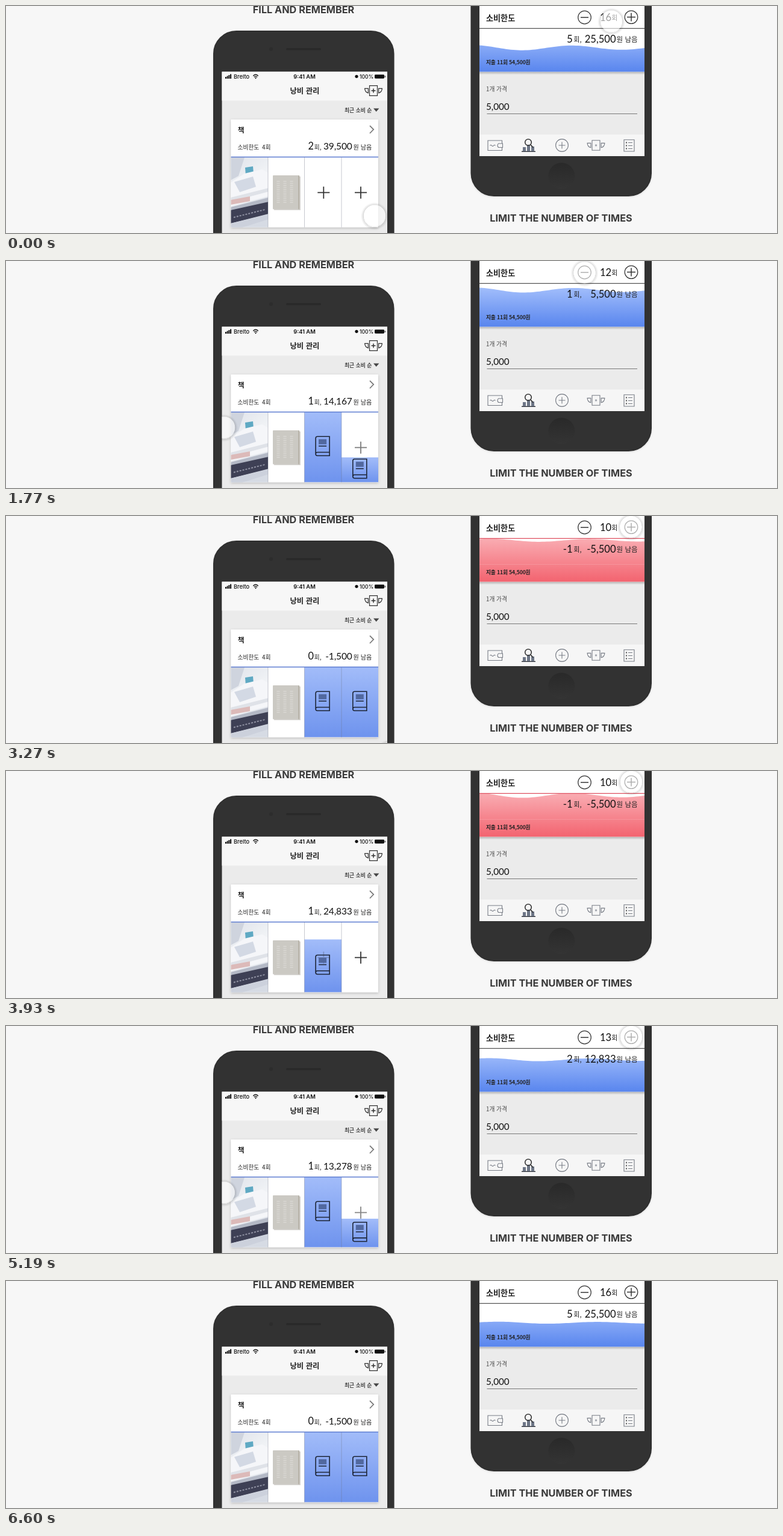
These frames come from a looping animation (1280x378 px, 6.63 s). An HTML page:

```html
<!DOCTYPE html>
<html lang="ko">
<head>
<meta charset="utf-8">
<title>Spending limits</title>
<style>
html, body { margin: 0; width: 100%; height: 100%; overflow: hidden; background: #f7f7f7; }
svg { display: block; width: 100%; height: 100%; }
text { font-family: "Noto Sans CJK KR", "Noto Sans CJK JP", "Noto Sans CJK", sans-serif; fill: #222; }
.head { font: 700 16.25px Inter, sans-serif; fill: #3a3a3a; text-anchor: middle; }
.bar { font: 500 9.3px Inter, sans-serif; fill: #111; }
.num { font-family: Lato, sans-serif; fill: #111; }
.end { text-anchor: end; }
.line { fill: none; stroke: #333; stroke-width: 1.2; }
.tab { fill: none; stroke: #777c85; stroke-width: 1.1; }
</style>
</head>
<body>
<svg viewBox="0 0 1280 378" preserveAspectRatio="xMidYMid meet">
<defs>
  <linearGradient id="cellBlue" x2="0" y2="1"><stop stop-color="#a2bcf9"/><stop offset="1" stop-color="#6e93ee"/></linearGradient>
  <linearGradient id="water" gradientUnits="userSpaceOnUse" x1="0" x2="0" y1="40" y2="110"><stop id="waterTop"/><stop id="waterEnd" offset="1"/></linearGradient>
  <linearGradient id="drop" x2="0" y2="1"><stop stop-opacity=".24"/><stop offset="1" stop-opacity="0"/></linearGradient>
  <linearGradient id="home" x2="0" y2="1"><stop stop-color="#292929"/><stop offset="1" stop-color="#343434"/></linearGradient>
  <linearGradient id="desk" x2=".4" y2="1"><stop stop-color="#dfe3ea"/><stop offset=".5" stop-color="#f1f3f6"/><stop offset="1" stop-color="#d6dbe4"/></linearGradient>
  <radialGradient id="halo"><stop offset=".79" stop-opacity="0"/><stop offset=".8" stop-opacity=".13"/><stop offset="1" stop-opacity="0"/></radialGradient>
  <filter id="soft" x="-10%" y="-10%" width="120%" height="125%"><feDropShadow dx="0" dy="1.5" stdDeviation="2" flood-opacity=".2"/></filter>
  <filter id="faint" x="-10%" y="-10%" width="120%" height="125%"><feDropShadow dx="0" dy="1" stdDeviation="1.5" flood-opacity=".12"/></filter>
  <filter id="blur"><feGaussianBlur stdDeviation=".7"/></filter>
  <clipPath id="leftScreen"><path d="M358.5 109.5H633V378H358.5Z"/></clipPath>
  <clipPath id="rightScreen"><path d="M786 0H1060V250H786Z"/></clipPath>
  <clipPath id="cells"><path d="M373.5 252H618V368.5H373.5Z"/></clipPath>
  <clipPath id="photo"><path d="M373.5 252H435V368.5H373.5Z"/></clipPath>
  <clipPath id="tank"><path d="M786 37H1060.5V109.5H786Z"/></clipPath>
  <path id="wings" d="M-6.5-8.3H6.5V8.3H-6.5ZM-8.6-3.6H-14.4Q-14 2.6-8.6 3.8ZM8.6-3.6H14.4Q14 2.6 8.6 3.8Z"/>
  <g id="book">
    <rect x="-6.5" y="-11.5" width="13" height="8.5" fill="#51689f"/>
    <path d="M-11.5 12.5V-13Q-11.5-16 -8.5-16H11.5V16H-8.5Q-11.5 16-11.5 13Q-11.5 10.2-8.5 10.2H11.5M-6.5 0H6.5" fill="none" stroke="#1d2536" stroke-width="1.6"/>
  </g>
  <g id="touch">
    <circle cy="1" r="23" fill="url(#halo)"/>
    <circle r="18.4" fill="#fff" fill-opacity=".6" stroke="#000" stroke-opacity=".05"/>
  </g>
</defs>

<rect width="1280" height="378" fill="#f7f7f7"/>
<text class="head" x="494" y="12.3">FILL AND REMEMBER</text>
<text class="head" x="921.5" y="359.3">LIMIT THE NUMBER OF TIMES</text>

<!-- Left phone -->
<rect x="345" y="42" width="298.5" height="400" rx="37.5" fill="#333" stroke="#2e2e2e" stroke-width="2" filter="url(#faint)"/>
<rect x="465" y="70" width="58" height="3.4" rx="1.7" fill="#292929"/>
<circle cx="440" cy="71.7" r="3" fill="#2c2c2c"/>
<g clip-path="url(#leftScreen)">
  <rect x="358" y="109" width="276" height="270" fill="#ebebeb"/>
  <rect x="358" y="109" width="276" height="48.5" fill="#f7f7f7"/>
  <path d="M365 121v-3M367.7 121v-4.5M370.4 121v-6M373.1 121v-7.5" stroke="#111" stroke-width="2"/>
  <text class="bar" x="378" y="120.6">Brelto</text>
  <path d="M410.3 116.4Q414.5 112.2 418.7 116.4M412 118.4Q414.5 115.8 417 118.4" fill="none" stroke="#111" stroke-width="1.4"/>
  <circle cx="414.5" cy="120" r="1.1"/>
  <text class="bar" x="495.5" y="120.8" text-anchor="middle" style="font-weight:600">9:41 AM</text>
  <circle cx="582" cy="117.3" r="2.6" fill="#111"/>
  <text class="bar" x="587" y="120.8" style="font-size:8.6px">100%</text>
  <rect x="612" y="114.3" width="16" height="6.4" rx="1.4" fill="#111"/><path d="M629.3 116v3" stroke="#111"/>
  <text x="496" y="146" font-size="12.4" font-weight="700" text-anchor="middle">낭비 관리</text>
  <use href="#wings" x="610" y="141" class="line"/>
  <path class="line" d="M606.5 141h7M610 137.5v7" style="stroke-width:1.5"/>
  <text x="562" y="177" font-size="8.8" font-weight="700" style="fill:#444">최근 소비 순</text>
  <path d="M610 170.5h9.4l-4.7 5.6z" fill="#444"/>
  <rect x="373.5" y="189" width="244.5" height="179.5" fill="#fff" filter="url(#soft)"/>
  <text x="384.8" y="211" font-size="11.8" font-weight="700">책</text>
  <path d="M604 199.3L610.2 205.6L604 212" fill="none" stroke="#777" stroke-width="1.7"/>
  <text x="384.6" y="238.8" font-size="9.7">소비한도</text>
  <text x="425" y="238.8" font-size="9.9">4회</text>
  <text class="num" id="leftCount" x="501.6" y="239" font-size="16.3"></text>
  <text x="511.5" y="239" font-size="10">회,</text>
  <text class="num end" id="leftSum" x="574.6" y="239" font-size="15.5" letter-spacing="-.15"></text>
  <text x="576.6" y="239" font-size="10.1">원 남음</text>

  <g clip-path="url(#photo)">
    <rect x="373" y="252" width="63" height="117" fill="url(#desk)"/>
    <g filter="url(#blur)">
      <path d="M373 252H396L386 283L373 290Z" fill="#cfd4de"/>
      <path d="M397 269L410 267L411 279L398 283Z" fill="#5fa9c3"/>
      <path d="M396 279L425 272L436 278V317L373 333V294Z" fill="#f5f6f9"/>
      <path d="M379 293L410 284L415 301L388 310Z" fill="#d3d9e4"/>
      <path d="M373 319L436 303V309L373 326Z" fill="#dfe2e8"/>
      <path d="M373 323L405 317V325L373 331Z" fill="#dcbab9"/>
      <path d="M373 335L436 319V327L373 343Z" fill="#b4b9c6"/>
      <path d="M373 340L436 326V346L373 362Z" fill="#3e4055"/>
      <path d="M378 352L430 339" stroke="#8f91a2" stroke-width="2" stroke-dasharray="3 2"/>
      <path d="M373 362L436 347V355L392 369H373Z" fill="#ccd1dc"/>
    </g>
  </g>
  <rect x="445" y="284" width="44" height="56" fill="#3a3020" opacity=".2" filter="url(#blur)"/>
  <rect x="443" y="282" width="44" height="56.5" rx="1" fill="#cbc9c3"/>
  <path d="M485.2 282.5h2v56h-2z" fill="#b5b1a6"/>
  <path d="M452 291v38M463 291v38M474 291v38" stroke="#d6d4cf" stroke-width="5" stroke-dasharray="2 1.5"/>
  <g id="cellBox" clip-path="url(#cells)"></g>
  <path d="M435 252v116.5M495.5 252v116.5M557 252v116.5" stroke="#6b7080" stroke-opacity=".38"/>
  <path d="M373.5 251.5H618" stroke="#5c7bd0" stroke-width="1.6"/>
  <use href="#touch" id="leftTouch"/>
</g>

<!-- Right phone -->
<rect x="772.5" y="-90" width="298.5" height="406" rx="37.5" fill="#333" stroke="#2e2e2e" stroke-width="2" filter="url(#faint)"/>
<circle cx="922.3" cy="283" r="22" fill="url(#home)"/>
<g clip-path="url(#rightScreen)">
  <rect x="786" width="275" height="250" fill="#ebebeb"/>
  <rect x="786" width="275" height="110" fill="#fff"/>
  <rect x="786" y="109.5" width="275" height="5" fill="url(#drop)"/>
  <path id="wave" fill="url(#water)" clip-path="url(#tank)"/>
  <path id="seam" d="M786 80.5H1060.5" stroke="#fff" stroke-opacity=".15"/>
  <path id="rule" d="M786 37.4H1060.5" stroke-width="1.1"/>
  <text x="797" y="24.6" font-size="13.1" font-weight="700">소비한도</text>
  <circle class="line" cx="960.5" cy="19" r="10.8"/><path class="line" d="M954 19h13" style="stroke-width:1.5"/>
  <circle class="line" cx="1038" cy="18.6" r="10.8"/><path class="line" d="M1031 18.6h14M1038 11.6v14" style="stroke-width:1.5"/>
  <text class="num" id="limit" x="986" y="24.8" font-size="16.6"></text>
  <text x="1005.3" y="24" font-size="11">회</text>
  <text class="num end" id="rightCount" x="940.8" y="61" font-size="16.8"></text>
  <text x="942.3" y="60" font-size="11">회,</text>
  <text class="num end" id="rightSum" x="1012.6" y="61" font-size="16.6"></text>
  <text x="1013.6" y="60" font-size="11.5">원 남음</text>
  <text x="797" y="97.4" font-size="8.7" font-weight="700" letter-spacing="-.15">지출 11회 54,500원</text>
  <text x="797" y="142" font-size="9.7" style="fill:#444">1개 가격</text>
  <text class="num" x="797" y="173" font-size="15.2">5,000</text>
  <path d="M798.5 179.5H1048" stroke="#777"/>
  <rect x="786" y="214" width="275" height="36" fill="#f6f6f6"/>
  <path class="tab" d="M823.5 228.5V224H800V240.5H823.5V236M824.5 229H817.5Q814.5 232.3 817.5 235.5H824.5ZM803.5 232.5q1.5-2 3 0t3 0t3 0"/>
  <path d="M856 242.3H879" stroke="#2c2f36" stroke-width="1.4"/>
  <path d="M858 235h5v7h-5zM865 231h5v11h-5zM872 234h5v8h-5z" fill="#6d7686"/>
  <circle cx="867" cy="227" r="5.3" class="line" style="stroke-width:1.6"/><path class="line" d="M870.8 231L875 235.5" style="stroke-width:1.8"/>
  <circle class="tab" cx="923" cy="232" r="10.4"/><path class="tab" d="M917.5 232h11M923 226.5v11"/>
  <use href="#wings" x="979.5" y="232" class="tab"/><circle cx="979.5" cy="232" r="1.7" fill="#a3a7ae"/>
  <path class="tab" d="M1026 222.7H1043V242H1026ZM1033 227.5h7M1033 232.5h7M1033 237.5h7"/>
  <path d="M1029 227.5h2M1029 232.5h2M1029 237.5h2" stroke="#555" stroke-width="2"/>
  <use href="#touch" id="rightTouch"/>
</g>
</svg>
<script>
const LOOP = 6630, CYCLE = 3400, COUNT = 450, STEP = 30;
const $ = id => document.getElementById(id);
const ramp = (t, a, b) => Math.min(1, Math.max(0, (t - a) / (b - a)));
const smooth = p => p * p * (3 - 2 * p);
const money = v => (Math.round(v) + 0).toLocaleString('en-US');
const whole = v => String(Math.round(v) + 0);
const mix = (a, b, p) => `rgb(${a.map((v, i) => Math.round(v + (b[i] - v) * p))})`;

const cells = [[526.3, 495.5, 61.5, 200], [588, 557, 61, 1650]].map(([cx, x, w, start]) => {
  const g = document.createElementNS('http://www.w3.org/2000/svg', 'g');
  g.innerHTML = `<rect x="${x}" width="${w}" fill="url(#cellBlue)"/>
    <path d="M${cx - 9} 310.7h20M${cx + 1} 300.7v20" stroke="#333" stroke-width="1.8"/>
    <use href="#book"/>`;
  $('cellBox').append(g);
  const [fill, plus, book] = g.children;
  return { cx: cx - .7, start, fill, plus, book };
});

// Touch points: time, x, y
const leftPath = [
  [-170, 640, 402], [0, 612, 349], [140, 527, 311], [220, 527, 311], [450, 395, 296],
  [451, 624, 402], [1040, 624, 402], [1190, 598, 341], [1330, 588, 311], [1470, 588, 311],
  [1770, 362, 277], [2130, 334, 273]
];
const rightPath = [
  [0, 1005, 25], [300, 960.5, 19], [2750, 960.5, 19], [3300, 1038, 17.5]
];
const taps = [[450, -2], [1250, -2], [2070, -2], [4100, 2], [4860, 2], [5677.5, 2]];

function along(path, t) {
  const i = path.findIndex(k => k[0] > t);
  if (i < 0) return path[path.length - 1].slice(1);
  if (!i) return path[0].slice(1);
  const [a, b] = [path[i - 1], path[i]];
  const p = smooth(ramp(t, a[0], b[0]));
  return [1, 2].map(k => a[k] + (b[k] - a[k]) * p);
}

function place(el, [x, y], scale, opacity) {
  el.setAttribute('transform', `translate(${x} ${y}) scale(${scale})`);
  el.setAttribute('opacity', opacity);
}

function drawLeft(t) {
  const tau = t % CYCLE;
  const fillAt = d => d <= 0 ? 0 : 1 - Math.exp(-Math.pow(d / 245, 1.15));
  for (const c of cells) {
    const p = fillAt(tau - c.start), h = 116.5 * p;
    c.fill.setAttribute('y', 368.5 - h);
    c.fill.setAttribute('height', h);
    c.plus.setAttribute('opacity', 1 - p);
    place(c.book, [c.cx, 366.5 - h / 2], 1, Math.min(1, p * 4));
  }
  const first = ramp(tau, 200, 200 + COUNT);
  const second = Math.min(21000, Math.max(0, tau - 1650) * 20000 / COUNT);
  $('leftSum').textContent = money(39500 - 20000 * first - second);
  $('leftCount').textContent = whole(2 - first - second / 21000);

  const u = tau > 3230 ? tau - CYCLE : tau;
  const fade = u < 451 ? 1 - ramp(u, 300, 450) : 1 - ramp(u, 2000, 2130);
  place($('leftTouch'), along(leftPath, u), 1, fade);
}

function drawRight(t) {
  let n = 16, press = 0;
  for (const [at, step] of taps) {
    n += step * ramp(t, at, at + COUNT);
    press += Math.sin(Math.PI * ramp(t, at, at + 240));
  }
  $('limit').textContent = whole(n);
  $('rightCount').textContent = whole(n - 11);
  $('rightSum').textContent = money(5500 + (n - 12) * (n < 12 ? 5500 : 5000));

  const red = ramp(n, 12, 10);
  $('waterTop').setAttribute('stop-color', mix([166, 193, 252], [249, 170, 176], red));
  $('waterEnd').setAttribute('stop-color', mix([88, 133, 238], [243, 99, 111], red));
  $('rule').setAttribute('stroke', mix([85, 85, 85], [222, 80, 96], red));
  $('seam').setAttribute('opacity', red);

  // The surface sloshes: it flattens while its crest drifts right.
  const swing = Math.cos(2 * Math.PI * t / 1920);
  const level = 69.5 - (16 - n) * 5.25 + red * 2.5;
  const amp = 3.1 + 1.4 * swing, crest = 797 - 22 * swing;
  let d = 'M786 110';
  for (let x = 786; x <= 1062; x += 4) {
    const calm = 1 - .3 * ramp(x, 786, 1060);
    const y = level - amp * calm * Math.cos(2 * Math.PI * (x - crest) / 165);
    d += `L${x} ${y.toFixed(2)}`;
  }
  $('wave').setAttribute('d', d + 'V110Z');
  place($('rightTouch'), along(rightPath, t), 1 - .06 * press, 1 - ramp(t, 6250, 6450));
}

function draw(t) {
  drawLeft(t);
  drawRight(t);
}

const began = performance.now();
function tick() {
  const t = (performance.now() - began) % LOOP;
  draw(Math.floor(t / STEP) * STEP);
  requestAnimationFrame(tick);
}
draw(0);
requestAnimationFrame(tick);
</script>
</body>
</html>
```
